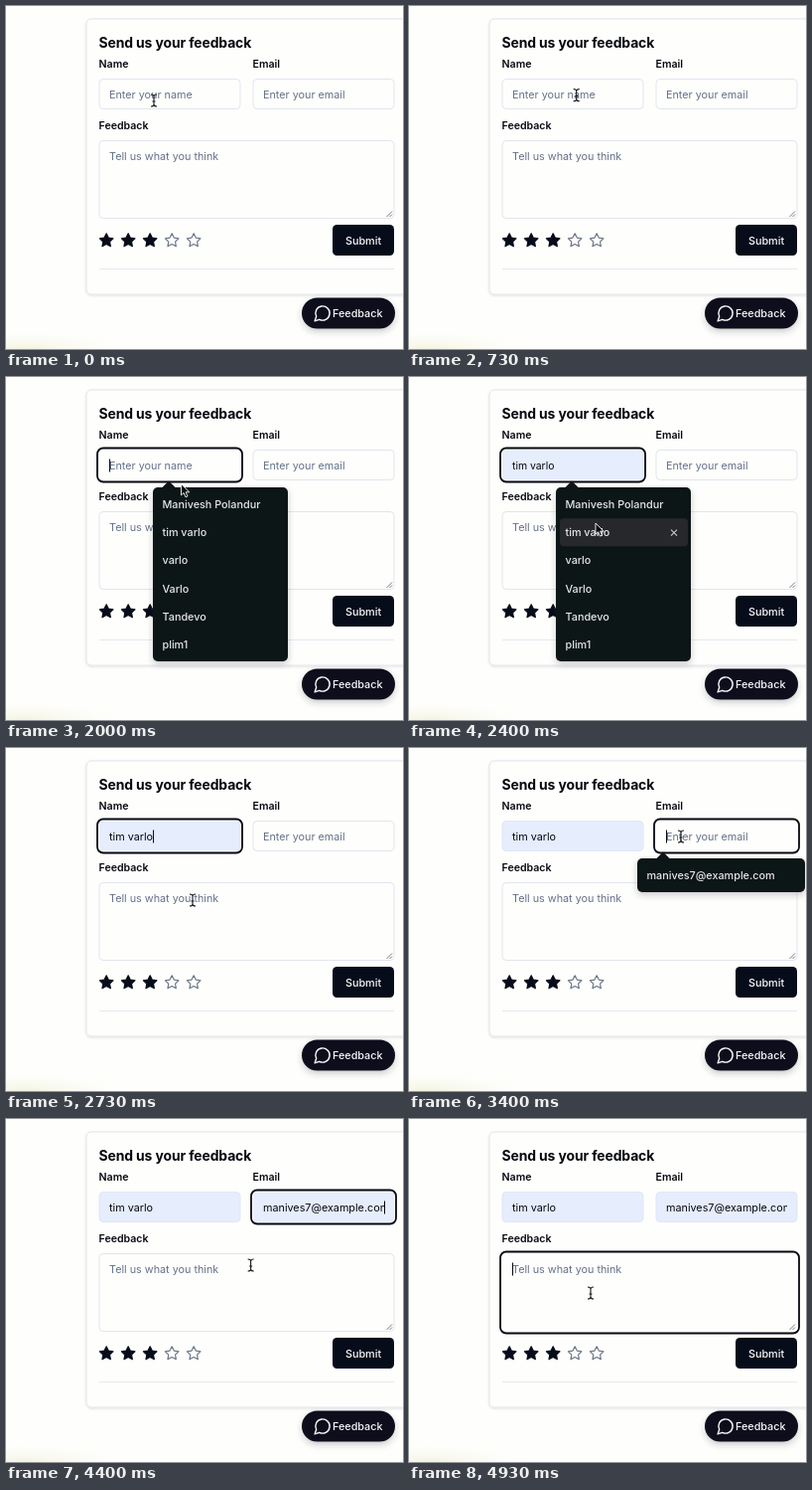
Write an HTML page that moves like this. It is 400 by 345 pixels and loops after 5 s.

```html
<!DOCTYPE html>
<html lang="en">
<head>
<meta charset="utf-8">
<title>Feedback form</title>
<style>
  html, body { margin: 0; width: 100%; height: 100%; overflow: hidden; background: #fefefc; }
  svg { display: block; width: 100%; height: 100%; }
  text { font-family: Inter, "Open Sans", sans-serif; font-size: 10.8px; fill: #05070f; white-space: pre; }
  .title { font-size: 13.9px; font-weight: 700; letter-spacing: -.1px; }
  .label { font-weight: 600; font-size: 10.6px; }
  .hint { fill: #64718a; }
  .light { fill: #f8fafc; font-weight: 500; }
  .item { fill: #e6e8ea; font-weight: 500; }
  .box { fill: #fefefc; stroke: #e2e5f0; }
  .dark { fill: #070c1a; }
  .menu { fill: #111318; }
  .ring { fill: #fefefc; stroke: #060913; stroke-width: 1.8; }
  .cross { stroke: #c6c8cc; stroke-width: 1.1; fill: none; }
</style>
</head>
<body>
<svg id="stage" viewBox="0 0 400 345"></svg>
<script>
const PERIOD = 5000;
const PERSON = "tim varlo";
const EMAIL = "manives7@example.com";
const NAMES = ["Manivesh Polandur", PERSON, "varlo", "Varlo", "Tandevo", "plim1"];
const ROW = 28.2;
const FILL = "#e6edfd";
const STAR = "M12 2l3.09 6.26L22 9.27l-5 4.87 1.18 6.88L12 17.77l-6.18 3.25L7 14.14 2 9.27l6.91-1.01z";

// Cursor stops: time, x, y
const PATH = [
  [0, 149, 95], [60, 149, 95], [900, 171, 89], [1800, 171, 89], [2330, 188, 147],
  [2480, 188, 147], [2700, 188, 153], [2780, 188, 153], [3100, 274, 89], [3560, 274, 89],
  [3930, 283, 131], [4250, 283, 131], [4620, 183, 175], [5000, 183, 175]
];
const CLICKS = [1590, 2440, 3080, 3970, 4610];
const RIPPLE = 240;

const rect = (x, y, w, h, r, cls, extra = "") =>
  `<rect x="${x}" y="${y}" width="${w}" height="${h}" rx="${r}" class="${cls}" ${extra}/>`;
const label = (x, y, s, cls = "", extra = "") =>
  `<text x="${x}" y="${y}" class="${cls}" ${extra}>${s}</text>`;
const cross = (x, y) => `M${x - 3} ${y - 3}l6 6m0-6l-6 6`;

const field = (id, x, y, w, h, hint) => `
  ${rect(x - 2, y - 2, w + 4, h + 4, 6, "ring", `id="${id}Ring"`)}
  ${rect(x, y, w, h, 4, "box", `id="${id}Box"`)}
  ${label(x + 10, y + 19.2, hint, "hint", `id="${id}Hint"`)}
  <g clip-path="url(#inner)">${label(x + 10, y + 19.2, "", "", `id="${id}Text"`)}</g>
  <path id="${id}Caret" stroke="#05070f"/>`;

const menu = (id, x, w, h, tip, items) => `
  <g id="${id}Menu">
    ${rect(x, 111, w, h, 5, "menu", 'filter="url(#shadow)"')}
    <path class="menu" d="M${tip - 7} 111.5l7-7 7 7z"/>
    <g id="${id}Hover">
      ${rect(x + 4, 114, w - 7, 28, 4, "", 'fill="#26282c"')}
      <path class="cross" d="${cross(x + w - 17, 128.5)}"/>
    </g>
    ${items.map((s, i) => label(x + 9.5, 132 + ROW * i, s, "item")).join("")}
  </g>`;

const star = i => `<path d="${STAR}" transform="translate(${93 + 22 * i} 227.5) scale(.68)"
  fill="${i < 3 ? "#070c1a" : "none"}" stroke="${i < 3 ? "#070c1a" : "#6b7589"}"
  stroke-width="1.7" stroke-linejoin="round"/>`;

const stage = document.getElementById("stage");
stage.innerHTML = `
  <defs>
    <clipPath id="inner"><rect x="94" y="70" width="287" height="150"/></clipPath>
    <filter id="shadow" x="-30%" y="-30%" width="160%" height="180%">
      <feDropShadow dx="0" dy="3" stdDeviation="3" flood-color="#30323c" flood-opacity=".25"/>
    </filter>
    <filter id="soft" x="-10%" y="-10%" width="120%" height="120%">
      <feDropShadow dx="0" dy="1" stdDeviation=".8" flood-color="#30323c" flood-opacity=".14"/>
    </filter>
    <radialGradient id="glow" cx=".3" cy="1" r=".75">
      <stop offset="0" stop-color="#f3f3e0"/><stop offset="1" stop-color="#fefefc" stop-opacity="0"/>
    </radialGradient>
  </defs>
  <rect width="400" height="345" fill="#fefefc"/>
  <rect x="-25" y="318" width="150" height="27" fill="url(#glow)"/>
  ${rect(81, 13, 340, 277, 5, "box", 'filter="url(#soft)"')}
  ${label(93.5, 41.6, "Send us your feedback", "title")}
  ${label(93.5, 62, "Name", "label")}
  ${label(248.5, 62, "Email", "label")}
  ${label(93.5, 124, "Feedback", "label")}
  ${field("name", 94, 73.5, 142, 30, "Enter your name")}
  ${field("email", 249, 73.5, 142, 30, "Enter your email")}
  ${field("note", 94, 135.5, 297, 78, "Tell us what you think")}
  <path d="M383.5 212l5.5-5.5m-2.5 5.5l2.5-2.5" stroke="#777a80"/>
  ${[0, 1, 2, 3, 4].map(star).join("")}
  ${rect(329, 220, 62, 31, 4.5, "dark")}
  ${label(360, 239.5, "Submit", "light", 'text-anchor="middle"')}
  <path d="M94 264.5h297" stroke="#e6e8f1"/>
  ${rect(298, 293.5, 94, 31, 15.5, "dark", 'filter="url(#shadow)"')}
  <path d="M7.9 20A9 9 0 1 0 4 16.1L2 22z" transform="translate(309.5 299.5) scale(.79)"
    fill="none" stroke="#f8fafc" stroke-width="1.8" stroke-linejoin="round"/>
  ${label(329, 313, "Feedback", "light")}
  ${menu("name", 148, 136, 175, 164, NAMES)}
  ${menu("email", 230, 169, 34, 256, [EMAIL])}
  <g id="ripple" fill="none">
    <circle stroke="#fefefc" stroke-width="3" stroke-opacity=".65"/>
    <circle stroke="#05070f" stroke-width="1.4"/>
  </g>
  <path id="beam" d="M-3-6q3 0 3 2q0-2 3-2M-3 6q3 0 3-2q0 2 3 2M0-4v8M-1.5 1h3"
    fill="none" stroke="#14161c" stroke-width="1.1"/>
  <path id="arrow" d="M0 0v11.2l2.6-2.4 1.9 4.3 2-.9-1.9-4.1h3.6z"
    fill="#05070f" stroke="#fefefc" stroke-width=".9" stroke-linejoin="round"/>`;

const $ = id => document.getElementById(id);
const show = (id, on) => $(id).setAttribute("visibility", on ? "inherit" : "hidden");
const ease = p => p * p * (3 - 2 * p);

function cursorAt(t) {
  const i = Math.max(1, PATH.findIndex(p => p[0] > t));
  const [t0, x0, y0] = PATH[i - 1], [t1, x1, y1] = PATH[i];
  const p = ease((t - t0) / (t1 - t0));
  return [x0 + (x1 - x0) * p, y0 + (y1 - y0) * p];
}

function setField(id, x, y, { value = "", preview = "", focus = false }) {
  const text = $(id + "Text"), shown = preview || value;
  text.textContent = shown;
  text.style.fontSize = preview ? "10.4px" : "";
  show(id + "Ring", focus);
  show(id + "Hint", !shown);
  show(id + "Caret", focus && !preview);
  const box = $(id + "Box");
  box.style.fill = shown ? FILL : "";
  box.style.stroke = focus ? "none" : shown ? "#dfe6f6" : "";
  const end = value ? Math.min(text.getComputedTextLength(), 122) : 0;
  $(id + "Caret").setAttribute("d", `M${x + 10.5 + end} ${y + 9}v13`);
}

function draw(t) {
  const [x, y] = cursorAt(t);
  const nameOpen = t >= 1720 && t < 2660;
  const emailOpen = t >= 3260 && t < 4220;
  const inName = nameOpen && y >= 114;
  const inEmail = emailOpen && y >= 114;
  const row = Math.floor((y - 114) / ROW);

  setField("name", 94, 73.5, {
    value: t >= 2660 ? PERSON : "",
    preview: inName ? NAMES[row] : "",
    focus: t >= 1660 && t < 3200
  });
  setField("email", 249, 73.5, {
    value: t >= 4220 ? EMAIL : "",
    preview: inEmail ? EMAIL : "",
    focus: t >= 3200 && t < 4730
  });
  setField("note", 94, 135.5, { focus: t >= 4730 });

  show("nameMenu", nameOpen);
  show("emailMenu", emailOpen);
  show("nameHover", inName);
  show("emailHover", inEmail);
  $("nameHover").setAttribute("transform", `translate(0 ${ROW * row})`);

  const inField = (y > 73 && y < 104) || (y > 135 && y < 214);
  const beam = inField && !inName && !inEmail;
  show("beam", beam);
  show("arrow", !beam);
  for (const id of ["beam", "arrow"]) $(id).setAttribute("transform", `translate(${x} ${y})`);

  const start = CLICKS.find(c => t >= c && t < c + RIPPLE);
  show("ripple", start !== undefined);
  if (start !== undefined) {
    const p = (t - start) / RIPPLE;
    $("ripple").setAttribute("transform", `translate(${x} ${y})`);
    $("ripple").setAttribute("opacity", 1 - p * p);
    for (const c of $("ripple").children) c.setAttribute("r", 12.5 + 10 * p);
  }
}

const begin = performance.now();
function tick() {
  draw((performance.now() - begin) % PERIOD);
  requestAnimationFrame(tick);
}
tick();
</script>
</body>
</html>
```
